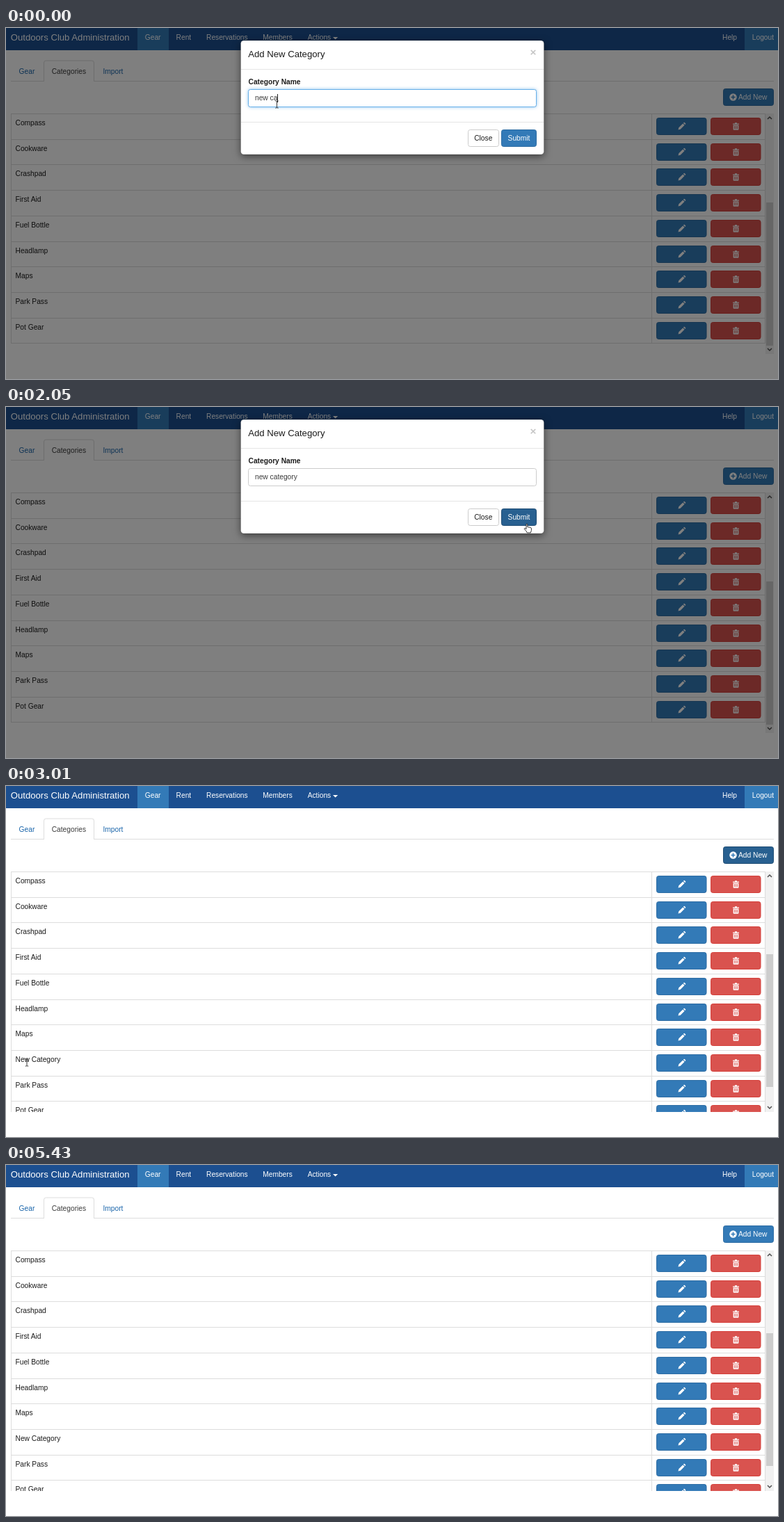
Animation, 1110 px wide and 505 px high, one loop 5550 ms. Source, as an HTML page:

```html
<!DOCTYPE html>
<html lang="en">
<head>
<meta charset="utf-8">
<title>Gear categories</title>
<style>
html, body { margin: 0; width: 100%; height: 100%; overflow: hidden; background: #fff; }
svg { display: block; width: 1110px; height: 505px; }
text { font: 10.22px "Liberation Sans", Arial, sans-serif; fill: #1c1c1c; white-space: pre; }
.big { font-size: 13.14px; }
.bold { font-weight: bold; }
.white { fill: #fff; }
.link { fill: #1b66ab; }
.line { fill: #ddd; }
.primary { fill: #337ab7; stroke: #2e6da4; }
.primary.dark { fill: #286090; stroke: #204d74; }
.danger { fill: #d9534f; stroke: #d43f3a; }
#panel { filter: drop-shadow(0 3.6px 5.5px rgba(0, 0, 0, .5)); }
#glow { filter: drop-shadow(0 0 2.5px rgba(102, 175, 233, .7)); }
</style>
</head>
<body>
<svg viewBox="0 0 1110 505">
  <defs>
    <path id="pencil" fill="#fff" d="M-5 5l.8-3.2 5.9-5.9 2.4 2.4-5.9 5.9zM2.4-4.8l.7-.6q.6-.5 1.200 0l1.200 1.200q.5.6 0 1.200l-.7.6z"/>
    <path id="trash" fill="#fff" fill-rule="evenodd" d="M-4.500-4h3v-1.200h3v1.200h3v1.300h-9zM-3.900-2h7.800v6.300q0 .9-.9.9h-6q-.9 0-.9-.9zM-2.400-.8v4.600h.9v-4.600zM-.45-.8v4.600h.9v-4.600zM1.500-.8v4.600h.9v-4.600z"/>
    <clipPath id="listArea"><rect y="123" width="1110" height="346"/></clipPath>
    <clipPath id="selArea"><rect class="sel" x="13.500" y="388" width="0" height="11.500"/></clipPath>
  </defs>

  <rect width="1110" height="505" fill="#fff"/>
  <rect width="1110" height="32" fill="#1c4f90"/>
  <rect x="189" width="45" height="32" fill="#337ab7"/>
  <rect x="1062" width="48" height="32" fill="#337ab7"/>
  <text class="big white" x="6.800" y="18">Outdoors Club Administration</text>
  <g id="nav"></g>
  <path d="M470 13h7.200l-3.600 3.600z" fill="#fff"/>

  <rect class="line" x="7" y="76" width="1097" height="1"/>
  <path d="M54.500 77V50q0-3 3-3h66q3 0 3 3v27" fill="#fff" stroke="#ddd"/>
  <text class="link" x="18.600" y="65.500">Gear</text>
  <text x="65.700" y="65.500" fill-opacity=".85">Categories</text>
  <text class="link" x="139.500" y="65.500">Import</text>

  <rect id="addNew" class="primary" x="1031.500" y="87.500" width="72" height="24" rx="2.900"/>
  <circle cx="1045.500" cy="99.500" r="5.200" fill="#fff"/>
  <path d="M1042.500 99.500h6m-3-3v6" stroke="#337ab7" stroke-width="1.600"/>
  <text class="white" x="1053" y="103.300">Add New</text>

  <g id="list" clip-path="url(#listArea)"></g>
  <rect class="sel" x="13.500" y="388" width="0" height="11.500" fill="#39f"/>
  <text id="selText" class="white" x="13.500" y="397.400" clip-path="url(#selArea)">New Category</text>

  <rect x="1092" y="123" width="12" height="346" fill="#f1f1f1"/>
  <rect id="thumb" x="1093" width="10" fill="#cdcdcd"/>
  <path d="M1095 131l3-3 3 3M1095 461l3 3 3-3" fill="none" stroke="#505050" stroke-width="1.500"/>

  <rect id="backdrop" width="1110" height="505"/>
  <g id="modal">
    <rect id="panel" x="337.500" y="18" width="436" height="164" rx="4.400" fill="#fff" stroke="#000" stroke-opacity=".2"/>
    <text id="title" class="big" x="348.300" y="42.300"></text>
    <text class="bold" x="753.600" y="40" style="font-size:15.300px" fill-opacity=".25">×</text>
    <rect x="338" y="59" width="435" height="1" fill="#e5e5e5"/>
    <text class="bold" x="348.500" y="81">Category Name</text>
    <rect id="field" x="348.500" y="88.500" width="414" height="25" rx="2.900" fill="#fff" stroke="#ccc"/>
    <rect id="glow" x="348.500" y="88.500" width="414" height="25" rx="2.900" fill="#fff" stroke="#66afe9"/>
    <text id="entry" x="358" y="104.300"></text>
    <rect id="caret" y="95" width="1" height="12" fill="#222"/>
    <rect x="338" y="135" width="435" height="1" fill="#e5e5e5"/>
    <rect x="664.500" y="146.500" width="44" height="24" rx="2.900" fill="#fff" stroke="#ccc"/>
    <text x="673.200" y="162">Close</text>
    <rect id="submit" class="primary" x="712.500" y="146.500" width="50" height="24" rx="2.900"/>
    <text class="white" x="721.600" y="162">Submit</text>
  </g>

  <g id="cursor">
    <path id="arrow" d="M0 0v9.600l2.200-2 1.500 3.400 1.500-.7-1.500-3.200h3z" fill="#fff" stroke="#222" stroke-width=".8"/>
    <path id="beam" d="M-2.200-5h1.700l.5.500.5-.5h1.700M0-4.500v9M-2.200 5h1.700l.5-.5.500.5h1.700" fill="none" stroke="#222" stroke-width=".9"/>
    <path id="hand" d="M-1 1q0-1 .9-1t.9 1v3.600l4.400.8q1.200.3 1.200 1.500v2.600l-1 3.400h-5.200l-1.100-2.200-2.700-3q-.4-1 .5-1.300.8-.2 2.100 1.200z" fill="#fff" stroke="#222" stroke-width=".9"/>
  </g>
</svg>
<script>
const LOOP = 5550;
const ROW = 36.72;
const $ = id => document.getElementById(id);
const set = (el, attrs) => { for (const k in attrs) el.setAttribute(k, attrs[k]); };
const show = (el, on) => { el.style.display = on ? '' : 'none'; };

$('nav').innerHTML = [
  ['Gear', 199.8], ['Rent', 244.600], ['Reservations', 288], ['Members', 369.200],
  ['Actions', 433.700], ['Help', 1030], ['Logout', 1072.800]
].map(([label, x]) => `<text class="white" x="${x}" y="17.200">${label}</text>`).join('');

const names = ['Compass', 'Cookware', 'Crashpad', 'First Aid', 'Fuel Bottle',
  'Headlamp', 'Maps', 'Park Pass', 'Pot Gear'];

function button(kind, icon, x, y) {
  return `<rect class="${kind}" x="${x}" y="${y + 6.500}" width="71.500" height="24" rx="2.900"/>
    <use href="#${icon}" x="${x + 36}" y="${y + 18.500}"/>`;
}

function drawList(rows) {
  const height = rows.length * ROW;
  const sides = [7, 928, 1091].map(x =>
    `<rect class="line" x="${x}" y="123" width="1" height="${height}"/>`).join('');
  const lines = [...rows, ''].map((_, i) =>
    `<rect class="line" x="7" y="${Math.round(123 + i * ROW)}" width="1085" height="1"/>`).join('');
  const cells = rows.map((name, i) => {
    const y = Math.round(123 + i * ROW);
    return `<text x="13.500" y="${140 + i * ROW}">${name}</text>`
      + button('primary', 'pencil', 935.500, y) + button('danger', 'trash', 1013.500, y);
  }).join('');
  $('list').innerHTML = sides + lines + cells;
}

// [time, kind, x, y]: the pointer jumps at each time
const pointer = [
  [0, 'beam', 389.500, 110], [850, 'beam', 414, 109], [970, 'beam', 475, 108],
  [1090, 'beam', 560, 107], [1210, 'beam', 643, 109], [1330, 'arrow', 694.500, 142],
  [1450, 'hand', 733, 158], [1570, 'hand', 751, 170], [1690, 'hand', 750, 169],
  [1810, 'hand', 749, 168], [2410, 'arrow', 745, 176], [2530, 'arrow', 700, 192],
  [2650, 'arrow', 520, 255], [2770, 'arrow', 290, 335], [2890, 'arrow', 95, 384],
  [3010, 'beam', 30, 398], [3130, 'beam', 20, 400], [3250, 'beam', 16, 399],
  [3370, 'beam', 18, 398], [3490, 'beam', 46, 397], [3610, 'arrow', 88.500, 393.500],
  [3730, 'arrow', 85, 393.500], [3980, 'arrow', 150, 384], [4100, 'arrow', 330, 360],
  [4220, 'arrow', 520, 336], [4340, 'arrow', 625, 326], [4460, 'arrow', 589, 339],
  [4580, 'arrow', 340, 352], [4700, 'arrow', 87, 366], [4950, 'arrow', 150, 378],
  [5070, 'arrow', 420, 415], [5190, 'arrow', 760, 455], [5310, 'arrow', 989, 494],
  [5430, 'none', 0, 0]
];
const letters = [[0, 6], [120, 7], [240, 8], [360, 9], [480, 10], [730, 11], [850, 12]];
const selection = [[0, 0], [3490, 1], [3610, 5], [3730, 12], [4950, 0]];
const focus = [[0, 1], [1930, .5], [2050, 0]];
const caretOn = [[0, 1], [1330, 0], [1810, 1], [1930, 0]];
const at = (keys, t) => keys.findLast(k => k[0] <= t);

let listed = null;
function render(t) {
  const saved = t >= 2170;
  if (saved !== listed) {
    listed = saved;
    drawList(saved ? names.toSpliced(7, 0, 'New Category') : names);
    set($('thumb'), saved ? { y: 242, height: 191 } : { y: 251, height: 206 });
  }

  const fade = t < 2170 ? 1 : t < 2290 ? .74 : 0;
  set($('backdrop'), { opacity: fade / 2 });
  set($('modal'), { opacity: fade, transform: `translate(0 ${saved ? -8 : 0})` });
  show($('modal'), fade > 0);
  $('title').textContent = saved ? 'null Category' : 'Add New Category';
  $('entry').textContent = saved ? 'backpack' : 'new category'.slice(0, at(letters, t)[1]);
  $('entry').style.fill = saved ? '#999' : '#3c3c3c';
  set($('field'), { fill: saved ? '#fff' : '#fff' });
  set($('glow'), { opacity: at(focus, t)[1] });
  show($('caret'), at(caretOn, t)[1]);
  if (!saved) set($('caret'), { x: Math.round(358 + $('entry').getComputedTextLength() - .5) });
  $('submit').classList.toggle('dark', t >= 1450);
  $('addNew').classList.toggle('dark', t >= 2530 && t < 3250);

  const count = at(selection, t)[1];
  const width = count ? $('selText').getSubStringLength(0, count) : 0;
  document.querySelectorAll('.sel').forEach(el => set(el, { width }));

  const [, kind, x, y] = at(pointer, t);
  for (const id of ['arrow', 'beam', 'hand']) show($(id), id === kind);
  set($('cursor'), { transform: `translate(${x} ${y})` });
}

const start = performance.now();
function tick() {
  render((performance.now() - start) % LOOP);
  requestAnimationFrame(tick);
}
tick();
</script>
</body>
</html>
```
